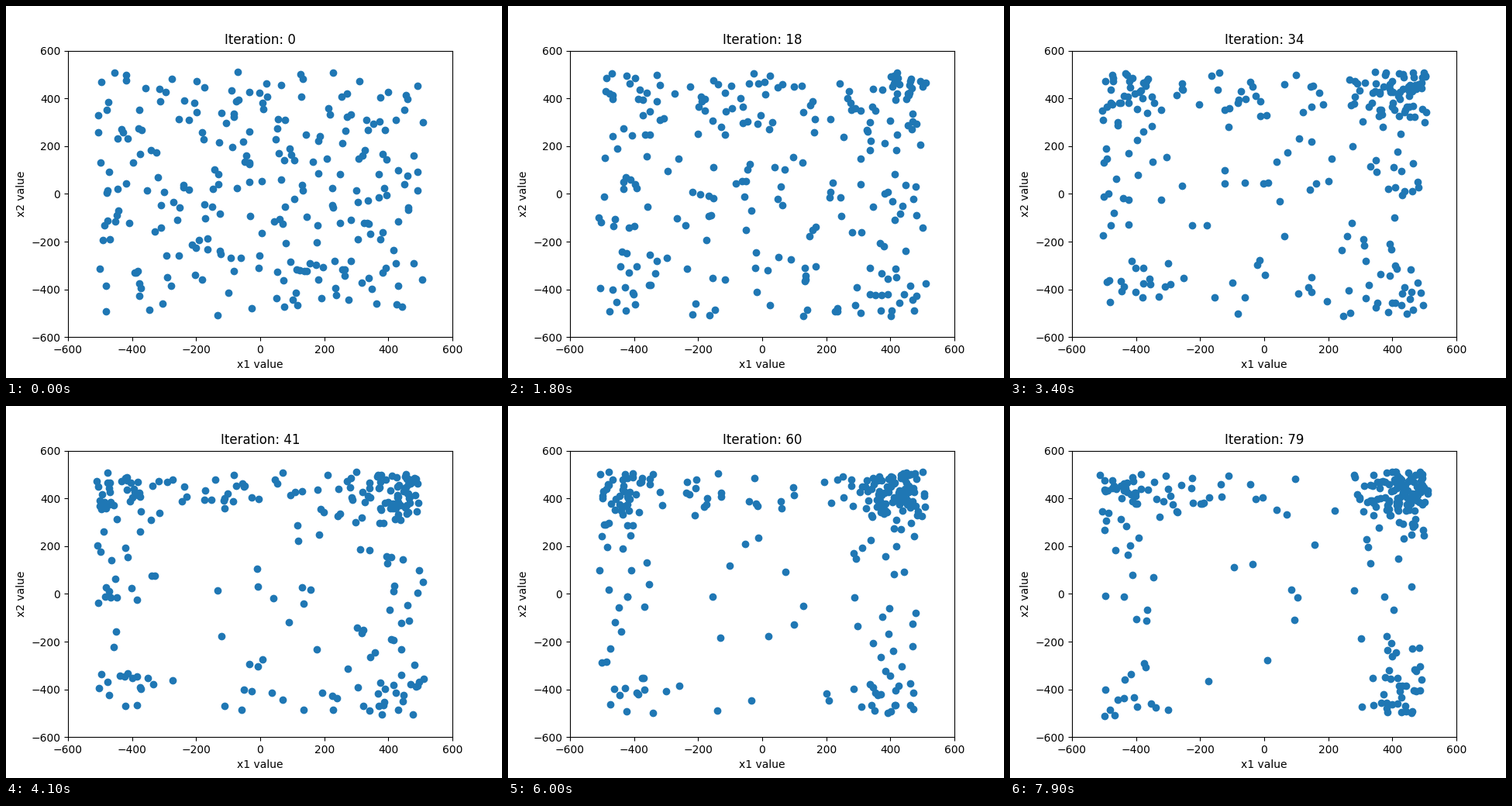
Animation, 640 px wide and 480 px high, one loop 8 s. Source, as a matplotlib script:

```python
import numpy as np
import matplotlib.pyplot as plt
from matplotlib.animation import FuncAnimation

FRAMES = 80
INTERVAL = 100
COUNT = 252
BOUND = 512
STEP = 20        # spread of one small move
RESPAWN = 0.032  # chance of jumping to a better spot

rng = np.random.default_rng(7)


def uniform(n):
    return rng.uniform(-BOUND, BOUND, (n, 2))


def pull(v, low, floor):
    """Attraction along one axis: strong near +440, weaker near -440."""
    def bump(centre):
        return np.exp(-((v - centre) / 75) ** 2 / 2)
    return bump(440) + low * bump(-440) + floor


def density(pts):
    """How attractive each point is; zero outside the search box."""
    x, y = pts.T
    inside = np.abs(pts).max(axis=1) <= BOUND
    return inside * pull(x, 0.38, 0.05) * pull(y, 0.22, 0.03)


def evolve(pts, power):
    """Small accepted-or-rejected moves plus a few jumps to good spots."""
    trial = pts + rng.normal(0, STEP, pts.shape)
    ratio = (density(trial) / density(pts)) ** power
    accept = rng.random(COUNT) < ratio
    moved = np.where(accept[:, None], trial, pts)

    jump = rng.random(COUNT) < RESPAWN
    spots = uniform(3000)
    odds = density(spots) ** power
    picks = rng.choice(len(spots), jump.sum(), p=odds / odds.sum())
    moved[jump] = spots[picks]
    return moved


# The search grows more selective as it goes on.
history = [uniform(COUNT)]
for i in range(1, FRAMES):
    history.append(evolve(history[-1], min(1, 0.35 + i / 60)))

fig, ax = plt.subplots(figsize=(6.4, 4.8), dpi=100)
ax.set(xlim=(-600, 600), ylim=(-600, 600),
       xlabel="x1 value", ylabel="x2 value")
dots = ax.scatter(*history[0].T, color="#1f77b4")
title = ax.set_title("Iteration: 0")


def draw(i):
    dots.set_offsets(history[i])
    title.set_text(f"Iteration: {i}")
    return dots, title


anim = FuncAnimation(fig, draw, frames=FRAMES, interval=INTERVAL,
                     repeat=True, repeat_delay=0, blit=False)
plt.show()
```
